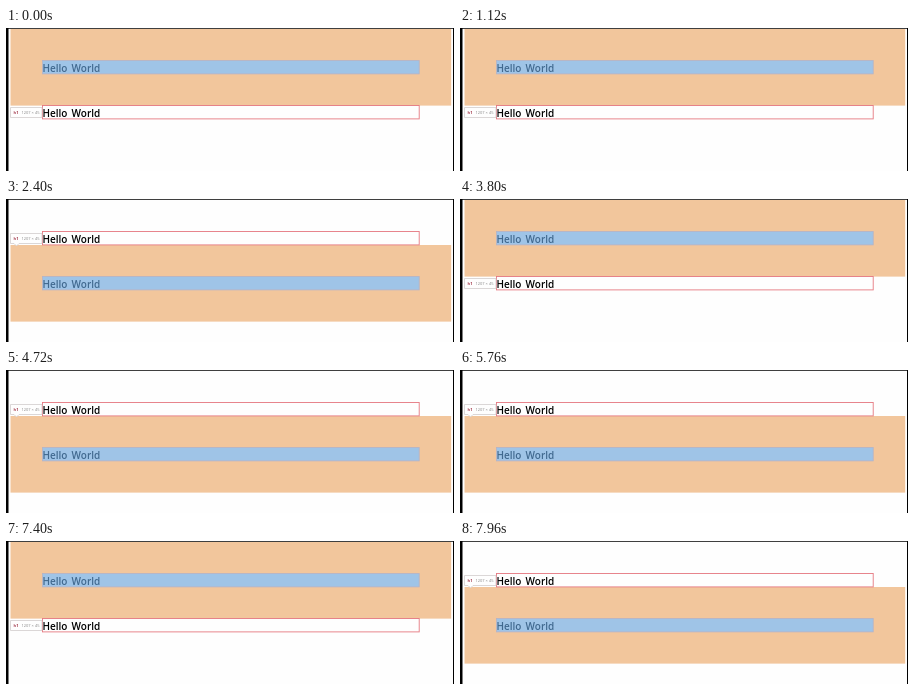
An HTML page that plays this animation: 448x143 px, repeating every 8 s.

```html
<!DOCTYPE html>
<html lang="en">
<head>
<meta charset="utf-8">
<style>
  html, body { margin: 0; width: 100%; height: 100%; overflow: hidden; background: #fefefe; }
  svg { display: block; width: 448px; height: 143px; }
  .title { font: 600 10px "Open Sans", "Noto Sans", sans-serif; word-spacing: 1.5px; }
  .tip { font: 4px "Open Sans", "Noto Sans", sans-serif; fill: #888; }
  .tag { font-weight: bold; fill: #a33a4c; }
</style>
</head>
<body>
<svg viewBox="0 0 448 143">
  <rect width="448" height="143" fill="#fefefe"/>
  <g id="margin">
    <rect x="4.5" y="1" width="440.7" height="76.6" fill="#f2c69c"/>
    <rect x="36.5" y="32.5" width="376.7" height="13.4" fill="#9fc4e7" stroke="#b5b3c6" stroke-width=".8"/>
    <text class="title" x="36.5" y="43.9" fill="#41698f">Hello World</text>
  </g>
  <g id="outlined">
    <rect x="36.5" y="32.5" width="376.7" height="13.4" fill="#fefefe" stroke="#e57880" stroke-width=".9"/>
    <text class="title" x="36.5" y="43.9" fill="#000">Hello World</text>
    <path id="bubble" fill="#fefefe" stroke="#d2cdcd" stroke-width=".8"/>
    <text class="tip" x="7.5" y="41.3"><tspan class="tag">h1</tspan><tspan x="15.4">1207 × 45</tspan></text>
  </g>
  <path d="M0 0H448V143H447V.7H2.5V143H0Z" fill="#000"/>
</svg>
<script>
  const LOOP = 8000, FIRST = 1400, STEP = 1580, SHIFT = 45;
  const el = id => document.getElementById(id);
  const moveY = (id, y) => el(id).setAttribute("transform", `translate(0 ${y})`);

  function draw(now) {
    const t = now % LOOP;
    // The inspector alternates between the upper and lower heading.
    const lower = t >= FIRST && Math.floor((t - FIRST) / STEP) % 2 === 0;
    moveY("margin", lower ? SHIFT : 0);
    moveY("outlined", lower ? 0 : SHIFT);
    el("bubble").setAttribute("d", lower
      ? "M4.5 34.5H36V44.5H13L10.5 47L8 44.5H4.5Z"
      : "M4.5 34.5H36V44.5H4.5Z");
    requestAnimationFrame(draw);
  }
  draw(performance.now());
</script>
</body>
</html>
```
